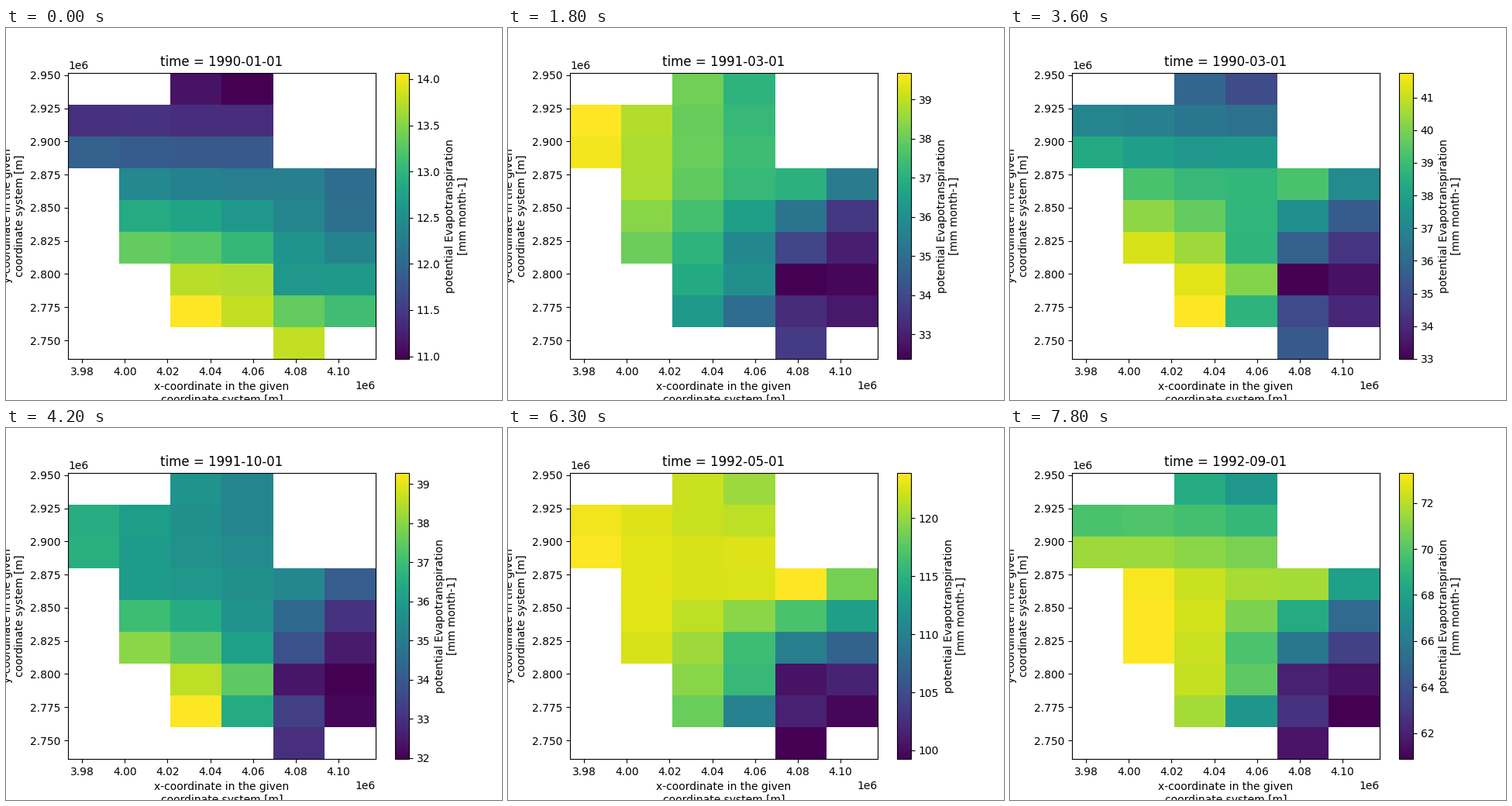
Write a matplotlib script that moves like this. It is 640x480 px and loops after 8000 ms.

```python
import matplotlib.pyplot as plt
import numpy as np
from matplotlib.animation import FuncAnimation

CELL = 24_000
LEFT, TOP = 3.97339e6, 2.95186e6
N_ROWS, N_COLS = 9, 6
FIRST_YEAR, N_MONTHS = 1990, 33
STEP_MS, TICK_MS, LOOP_MS = 300, 100, 8000

# The mapped region as blocks of cells: rows, columns
REGION = [(slice(0, 1), slice(2, 4)), (slice(1, 3), slice(0, 4)),
          (slice(3, 6), slice(1, 6)), (slice(6, 8), slice(2, 6)),
          (slice(8, 9), slice(4, 5))]

# Key cells (row, column): north, northwest, west, east, east edge,
# inner south, southwest, southeast, south
KEY_CELLS = np.array([(0, 3), (1, 0), (3, 1), (3, 4), (4, 5),
                      (6, 3), (7, 2), (6, 4), (8, 4)])

# Month index -> lowest value, highest value, percentages at the key cells
KEY_MONTHS = {
    0: (10.969, 14.070, [0, 14, 47, 43, 36, 88, 100, 53, 91]),
    11: (8.094, 9.530, [32, 73, 51, 31, 0, 72, 100, 4, 24]),
    18: (123.2, 146.03, [84, 52, 76, 88, 44, 79, 100, 7, 0]),
    21: (31.976, 39.295, [45, 62, 54, 46, 14, 75, 100, 5, 13]),
    24: (10.556, 12.712, [54, 100, 81, 38, 3, 48, 44, 27, 61]),
    28: (99.25, 123.93, [85, 98, 96, 100, 56, 67, 77, 5, 0]),
    32: (60.88, 73.31, [52, 71, 100, 87, 32, 75, 87, 6, 2]),
}


def distances(a, b):
    return np.linalg.norm(a[:, None] - b[None], axis=2)


outside = np.ones((N_ROWS, N_COLS), bool)
for block in REGION:
    outside[block] = False

# Radial interpolation from the key cells to the whole grid
cells = np.argwhere(np.ones_like(outside))
spread = distances(cells, KEY_CELLS) @ np.linalg.inv(
    distances(KEY_CELLS, KEY_CELLS))


def monthly_state(month):
    """Limits and key percentages, interpolated around the year."""
    by_season = {}
    for m in sorted(KEY_MONTHS, key=lambda m: -abs(m - month)):
        low, high, percents = KEY_MONTHS[m]
        by_season[m % 12] = [np.log(low), np.log(high), *percents]
    seasons = list(by_season)
    state = [np.interp(month % 12, seasons, track, period=12)
             for track in zip(*by_season.values())]
    return np.exp(state[0]), np.exp(state[1]), np.array(state[2:])


def monthly_values(month):
    low, high, percents = monthly_state(month)
    pattern = np.ma.array((spread @ percents).reshape(outside.shape),
                          mask=outside)
    pattern = (pattern - pattern.min()) / (pattern.max() - pattern.min())
    return low + (high - low) * pattern


# Months play in text order: 0, 1, 10, 11, ...
n_steps = -(-LOOP_MS // STEP_MS)
order = sorted(range(N_MONTHS), key=str)[:n_steps]

fig, ax = plt.subplots(figsize=(6.4, 4.8), dpi=100)
x_edges = LEFT + CELL * np.arange(N_COLS + 1)
y_edges = TOP - CELL * np.arange(N_ROWS + 1)
mesh = ax.pcolormesh(x_edges, y_edges, monthly_values(0), cmap="viridis")
ax.set_xlim(x_edges[0], x_edges[-1])
ax.set_ylim(y_edges[-1], y_edges[0])
ax.set_xlabel("x-coordinate in the given\ncoordinate system [m]")
ax.set_ylabel("y-coordinate in the given\ncoordinate system [m]")
title = ax.set_title("")
fig.colorbar(mesh, ax=ax,
             label="potential Evapotranspiration\n[mm month-1]")


def draw(frame):
    month = order[frame * TICK_MS // STEP_MS]
    values = monthly_values(month)
    mesh.set_array(values)
    # A new norm sets both limits at once, so the colorbar never sees a mix
    mesh.set_norm(plt.Normalize(values.min(), values.max()))
    title.set_text(f"time = {FIRST_YEAR + month // 12}-{month % 12 + 1:02d}-01")
    return mesh, title


animation = FuncAnimation(fig, draw, frames=LOOP_MS // TICK_MS,
                          interval=TICK_MS, repeat=True, repeat_delay=0)
plt.show()
```
